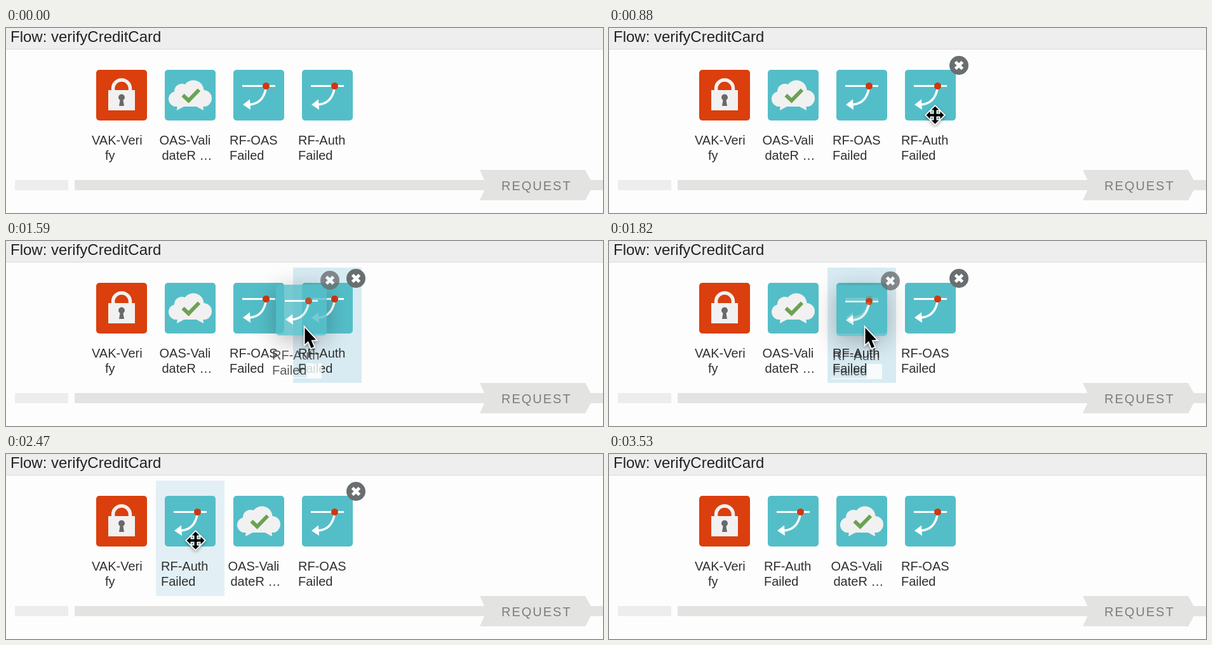
An HTML page with a canvas for the animation above (4710 ms loop, 940 by 292 pixels).

```html
<!DOCTYPE html>
<html lang="en">
<head>
<meta charset="utf-8">
<title>Flow: verifyCreditCard</title>
<style>
  html, body { margin: 0; width: 100%; height: 100%; overflow: hidden; background: #fdfdfd; }
  canvas { display: block; width: 940px; height: 292px; }
</style>
</head>
<body>
<canvas id="stage" width="940" height="292"></canvas>
<script>
const LOOP = 4710;
const SANS = '"Liberation Sans", Arial, sans-serif';
const TEAL = '#54bec8', PALE = '#f1f1f1', DOT = '#d1370c';
const stage = document.getElementById('stage').getContext('2d');
let g = stage;

const slotX = i => 142 + 108 * i;
const ICON_Y = 66;

function rect(x, y, w, h, color) {
  g.fillStyle = color;
  g.fillRect(x, y, w, h);
}

function roundRect(x, y, w, h, r, color) {
  g.fillStyle = color;
  g.beginPath();
  g.roundRect(x, y, w, h, r);
  g.fill();
}

function disc(x, y, r, color) {
  g.fillStyle = color;
  g.beginPath();
  g.arc(x, y, r, 0, Math.PI * 2);
  g.fill();
}

function trace(points, close = true) {
  g.beginPath();
  points.forEach(([x, y]) => g.lineTo(x, y));
  if (close) g.closePath();
}

function polygon(points, color) {
  trace(points);
  g.fillStyle = color;
  g.fill();
}

function stroke(color, width) {
  g.strokeStyle = color;
  g.lineWidth = width;
  g.stroke();
}

function text(str, x, y, size, color, family = SANS, spacing = 0) {
  g.font = `${size}px ${family}`;
  g.letterSpacing = `${spacing}px`;
  g.fillStyle = color;
  g.fillText(str, x, y);
}

function at(x, y, draw) {
  g.save();
  g.translate(x, y);
  draw();
  g.restore();
}

// Icons use the top left corner of their 80 px tile as origin.
function lockIcon() {
  roundRect(0, 0, 80, 80, 5, '#da3f0d');
  g.beginPath();
  g.moveTo(27, 34);
  g.arc(40, 29.5, 13.5, Math.PI, 0);
  g.lineTo(53.5, 34);
  stroke(PALE, 5.5);
  rect(19, 32, 42, 32, PALE);
  disc(40, 43.5, 5, '#696969');
  polygon([[38, 45], [42, 45], [44, 57], [36, 57]], '#696969');
}

function cloudIcon() {
  roundRect(0, 0, 80, 80, 5, TEAL);
  [[18, 46, 12], [27, 34, 12], [45, 33, 16.5], [61, 45, 13]].forEach(c => disc(...c, PALE));
  roundRect(8, 38, 64, 20, 9, PALE);
  polygon([[20, 54], [19, 64], [34, 56]], PALE);
  polygon([[46, 56], [61, 64], [60, 54]], PALE);
  trace([[28.5, 40], [37.5, 48.5], [54, 31.5]], false);
  stroke('#6ca253', 6);
}

function faultIcon() {
  roundRect(0, 0, 80, 80, 5, TEAL);
  g.beginPath();
  g.moveTo(14, 25.5);
  g.lineTo(66, 25.5);
  stroke('#fff', 3);
  g.beginPath();
  g.moveTo(51.5, 28);
  g.bezierCurveTo(49, 43, 41, 54, 25, 55);
  stroke('#fff', 3.5);
  polygon([[15, 55], [26, 46.5], [27, 63]], '#fff');
  disc(51.5, 25.5, 5.5, DOT);
}

const VERIFY = { icon: lockIcon, lines: [['VAK-Veri', -7], ['fy', 14]] };
const VALIDATE = { icon: cloudIcon, lines: [['OAS-Vali', -8.5], ['dateR \u2026', -4.5]] };
const OAS = { icon: faultIcon, lines: [['RF-OAS', -6], ['Failed', -6]] };
const AUTH = { icon: faultIcon, lines: [['RF-Auth', -6], ['Failed', -6]] };

function label(policy) {
  policy.lines.forEach(([str, x], i) => text(str, x, 118 + 24 * i, 20, '#303030'));
}

function item(policy) {
  policy.icon();
  label(policy);
}

function closeBadge() {
  disc(85, -7, 15, '#696e70');
  g.beginPath();
  g.moveTo(79.5, -12.5);
  g.lineTo(90.5, -1.5);
  g.moveTo(90.5, -12.5);
  g.lineTo(79.5, -1.5);
  stroke('#fff', 5);
}

// The dragged copy is rendered once and composited at a single opacity.
const PAD = 20;
const ghostLayer = document.createElement('canvas');
ghostLayer.width = 140;
ghostLayer.height = 210;
g = ghostLayer.getContext('2d');
at(PAD, 30, () => {
  rect(48, 124, 24, 24, '#fff');
  rect(-8, 146.5, 56, 1.5, '#fff');
  item(AUTH);
  closeBadge();
});
g = stage;

function ghost(x, y) {
  g.save();
  g.beginPath();
  g.rect(0, 0, 940, 292);
  g.roundRect(x, y, 80, 80, 5);
  g.clip('evenodd');
  g.shadowColor = 'rgba(0,0,0,.27)';
  g.shadowBlur = 36;
  g.shadowOffsetX = 2000;
  g.shadowOffsetY = 8;
  roundRect(x - 2000, y, 80, 80, 5, '#000');
  g.restore();
  g.globalAlpha = 0.8;
  g.drawImage(ghostLayer, x - PAD, y - 30);
  g.globalAlpha = 1;
}

const ARROW = [[0, 0], [0, 26], [5.5, 21], [10, 32], [14.5, 30], [10, 19.5], [17.5, 19]];

// One quarter of the four-way cursor, repeated by rotation.
const QUARTER = [[-2, -2], [-2, -8], [-6, -8], [0, -14], [6, -8], [2, -8]];
const FOUR_WAY = [0, 1, 2, 3].flatMap(k => {
  const c = [1, 0, -1, 0][k], s = [0, 1, 0, -1][k];
  return QUARTER.map(([x, y]) => [x * c - y * s, x * s + y * c]);
});

function cursor(points, x, y) {
  at(x, y, () => {
    g.save();
    g.shadowColor = 'rgba(0,0,0,.35)';
    g.shadowBlur = 5;
    g.shadowOffsetY = 2;
    trace(points);
    stroke('#fff', 3.6);
    g.restore();
    polygon(points, '#000');
  });
}

const arrow = (x, y) => cursor(ARROW, x - 1.5, y);
const fourWay = (x, y) => cursor(FOUR_WAY, x + 0.5, y + 0.5);

function tooltip(alpha) {
  g.globalAlpha = alpha;
  g.save();
  g.shadowColor = 'rgba(0,0,0,.3)';
  g.shadowBlur = 4;
  g.shadowOffsetY = 1;
  rect(297, 173, 166, 34, '#ececec');
  g.restore();
  g.strokeStyle = '#d0d0d0';
  g.lineWidth = 1;
  g.strokeRect(297.5, 173.5, 165, 33);
  text('RF-OASFailed', 307, 198, 22, '#3c3c3c', 'Inter, sans-serif');
  g.globalAlpha = 1;
}

function highlight(slot, alpha) {
  g.globalAlpha = alpha;
  rect(slotX(slot) - 14, 42, 108, 182, '#d8ebf2');
  g.globalAlpha = 1;
}

function background() {
  rect(0, 0, 940, 292, '#fdfdfd');
  rect(0, 0, 940, 33, '#eeeeee');
  rect(0, 33, 940, 1, '#dcdcdc');
  text('Flow: verifyCreditCard', 7, 22, 24, '#222');
  rect(14, 240, 84, 16, '#ededed');
  rect(108, 240, 832, 16, '#e3e3e1');
  polygon([[746, 224], [912, 224], [925, 248], [912, 272], [746, 272], [757, 248]], '#e3e3e1');
  text('REQUEST', 780, 256, 20, '#7d7d7d', SANS, 2);
}

const BURSTS = [[410, 470], [1410, 470], [1940, 470], [2470, 120], [2880, 470], [3410, 120]];
function snap(t) {
  const burst = BURSTS.filter(([start]) => start <= t).pop();
  if (!burst) return 0;
  const [start, length] = burst;
  const d = t - start;
  const step = d < 290 ? Math.floor(d / 60) * 60 : 290 + Math.floor((d - 290) / 60) * 60;
  return start + Math.min(step, length);
}

function along(keys, t) {
  let i = 1;
  while (i < keys.length - 1 && t > keys[i][0]) i++;
  const a = keys[i - 1], b = keys[i];
  const k = Math.min(1, Math.max(0, (t - a[0]) / (b[0] - a[0])));
  return a.slice(1).map((v, n) => v + (b[n + 1] - v) * k);
}

const DRAG = [[1410, -2, 1], [1590, -41, 3], [1760, -92, 4], [2060, -172, 4], [2230, -203, 4], [2410, -215, 3]];
const LEAVE = [[2880, 298, 136], [2940, 293, 155], [3000, 285, 180], [3120, 275, 228], [3240, 272, 276], [3300, 271, 300]];

function enterPosition(t) {
  const k = Math.min(1, (t - 410) / 470);
  const rest = (1 - k) ** 2;
  return [513 + 136 * rest, 137 + 135 * rest];
}

function render(t) {
  const dragging = t >= 1410 && t < 2470;
  const dropped = t >= 2470;
  const [dx, dy] = along(DRAG, t);
  const slot = dropped || dx < -167 ? 1 : dx < -59 ? 2 : 3;
  const order = [VERIFY, VALIDATE, OAS];
  order.splice(slot, 0, AUTH);

  background();
  if (dragging) highlight(slot, 1);
  if (t >= 2470 && t < 2590) highlight(1, t < 2530 ? 0.7 : 0.35);
  order.forEach((policy, i) => at(slotX(i), ICON_Y, () => item(policy)));

  let badge = -1, pointer = null;
  if (t >= 410 && t < 1410) {
    const [x, y] = enterPosition(t);
    const over = x < 560 && y < 224;
    if (over) badge = 3;
    pointer = () => (over ? fourWay : arrow)(x, y);
  } else if (dragging) {
    badge = 3;
    pointer = () => arrow(513 + dx, 137);
  } else if (t >= 2470 && t < 2880) {
    badge = 3;
    pointer = () => fourWay(298, 136);
  } else if (t >= 2880 && t < 3290) {
    const [x, y] = along(LEAVE, t);
    if (t < 3180) badge = t < 2940 ? 3 : 1;
    pointer = () => (y < 224 ? fourWay : arrow)(x, y);
  }

  if (badge >= 0) at(slotX(badge), ICON_Y, closeBadge);
  if (dragging) ghost(slotX(3) + dx, ICON_Y + dy);
  if (t >= 2880 && t < 3530) tooltip(t < 3410 ? 1 : t < 3470 ? 0.67 : 0.33);
  if (pointer) pointer();
}

const begin = performance.now();
function tick() {
  render(snap((performance.now() - begin) % LOOP));
  requestAnimationFrame(tick);
}
tick();
</script>
</body>
</html>
```
